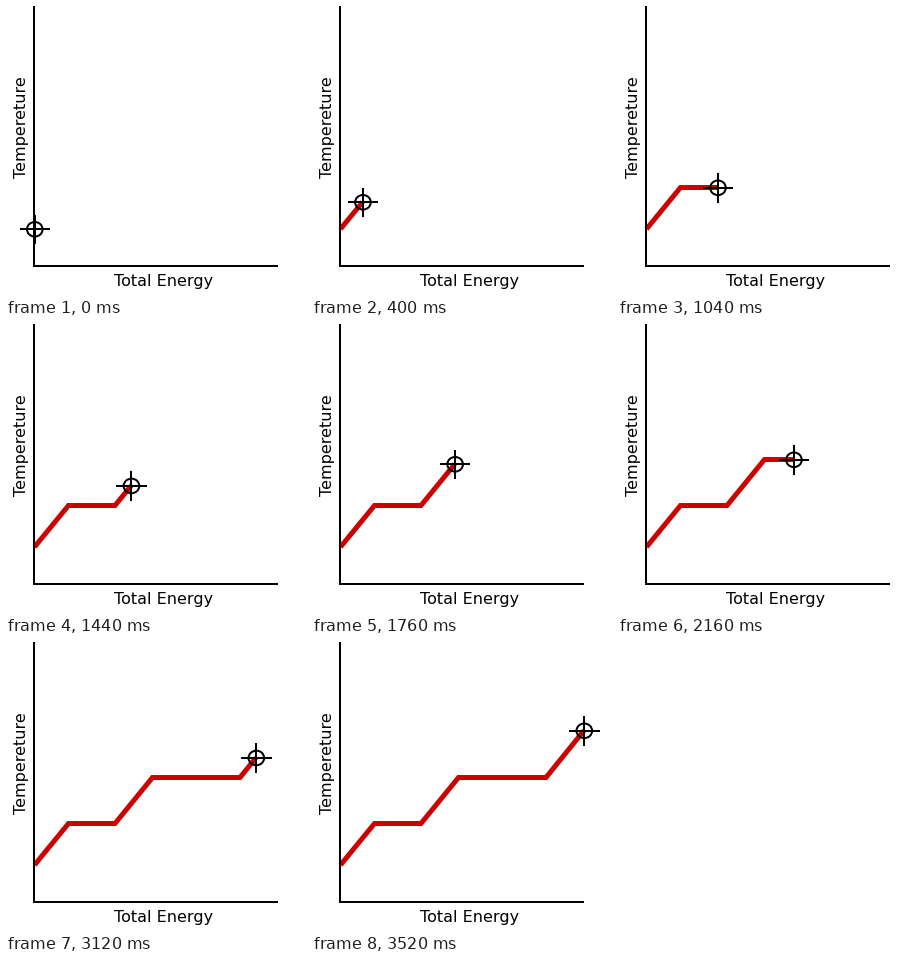
Animation of 300x290 px, one loop 3600 ms. Source, as a matplotlib script:

```python
import numpy as np
import matplotlib.pyplot as plt
from matplotlib.animation import FuncAnimation
from matplotlib.patches import Ellipse

W, H, DPI = 300, 290, 100
FRAMES, INTERVAL = 45, 80
PX = 72 / DPI  # points per pixel

# Heating curve: slopes and plateaus, traced at constant speed
KNOTS = np.array([(28.5, 223), (62.5, 181.5), (109, 181.5),
                  (146.5, 135.5), (234, 135.5), (272, 88.5)])
DIST = np.concatenate([[0], np.cumsum(np.hypot(*np.diff(KNOTS, axis=0).T))])
ARM_X, ARM_Y = 15.3, 14.7

fig = plt.figure(figsize=(W / DPI, H / DPI), dpi=DPI, facecolor="white")
ax = fig.add_axes([0, 0, 1, 1])
ax.set_xlim(0, W)
ax.set_ylim(H, 0)
ax.axis("off")


def line(xs, ys, width=2, color="black", z=3):
    return ax.plot(xs, ys, color=color, lw=width * PX, zorder=z,
                   solid_capstyle="butt", solid_joinstyle="miter")[0]


def label(x, y, text, angle=0):
    ax.text(x, y, text, family="DejaVu Sans", size=16 * PX, rotation=angle,
            rotation_mode="anchor", ha="left", va="baseline")


line([28, 28], [0, 261])
line([27, 272], [260, 260])
label(108, 280, "Total Energy")
label(20, 172, "Tempereture", 90)

curve = line([], [], 5, "#cc0000", 2)
h_arm = line([], [], z=5)
v_arm = line([], [], z=5)
ring = ax.add_patch(Ellipse((0, 0), 15.6, 14.6, fill=False, ec="black",
                            lw=2 * PX, zorder=5))


def update(i):
    s = DIST[-1] * i / (FRAMES - 1)
    tip = [np.interp(s, DIST, KNOTS[:, k]) for k in (0, 1)]
    path = np.vstack([KNOTS[DIST < s], tip])
    curve.set_data(path[:, 0], path[:, 1])
    x, y = tip[0] + 0.3, tip[1] + 0.3
    h_arm.set_data([x - ARM_X, x + ARM_X], [y, y])
    v_arm.set_data([x, x], [y - ARM_Y, y + ARM_Y])
    ring.set_center((x, y))
    return curve, h_arm, v_arm, ring


anim = FuncAnimation(fig, update, frames=FRAMES, interval=INTERVAL,
                     repeat=True, repeat_delay=0)
plt.show()
```
